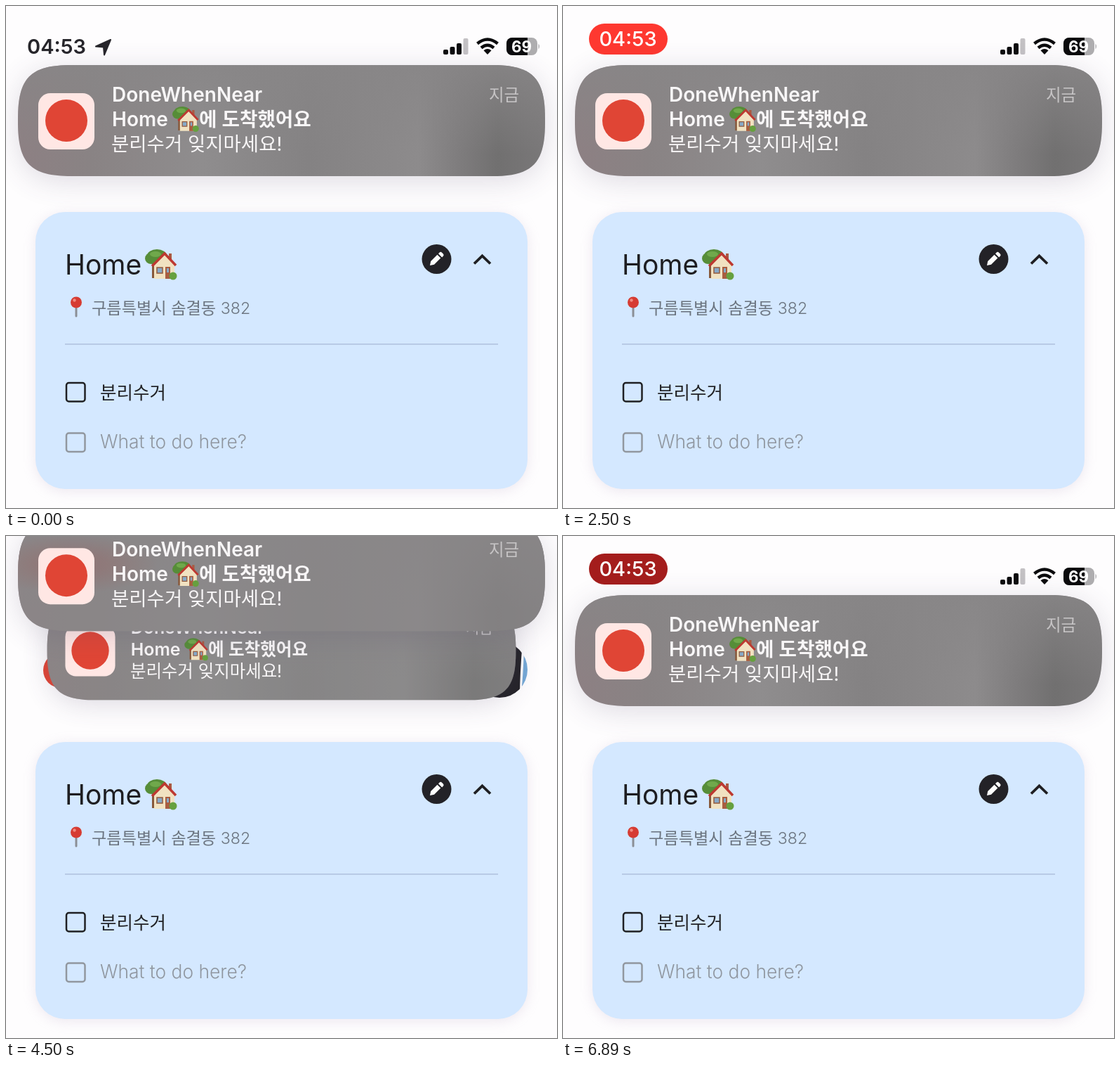
Write an HTML page that moves like this. It is 785 px wide and 714 px high and loops after 7080 ms.

```html
<!DOCTYPE html>
<html lang="ko">
<head>
<meta charset="utf-8">
<title>Arrival reminder</title>
<style>
  html, body { margin: 0; width: 100%; height: 100%; overflow: hidden; background: #fefdfe; }
  svg { display: block; width: 100%; height: 100%; }
  text { font-family: Inter, "Noto Sans CJK KR", "Noto Sans CJK", sans-serif; }
</style>
</head>
<body>
<svg viewBox="0 0 785 714">
  <defs>
    <linearGradient id="glass">
      <stop offset="0" stop-color="#8d8083"/>
      <stop offset=".14" stop-color="#898384"/>
      <stop offset=".35" stop-color="#8f8d8e"/>
      <stop offset=".55" stop-color="#848283"/>
      <stop offset=".76" stop-color="#8d8b8c"/>
      <stop offset=".84" stop-color="#7e7c7d"/>
      <stop offset=".91" stop-color="#717070"/>
      <stop offset="1" stop-color="#7a7879"/>
    </linearGradient>
    <linearGradient id="glassTop" x2="0" y2="1">
      <stop offset="0" stop-color="#888687" stop-opacity=".85"/>
      <stop offset=".8" stop-color="#888687" stop-opacity="0"/>
    </linearGradient>
    <radialGradient id="redGlow">
      <stop offset="0" stop-color="#b0261f"/>
      <stop offset=".4" stop-color="#b0261f" stop-opacity=".75"/>
      <stop offset="1" stop-color="#b0261f" stop-opacity="0"/>
    </radialGradient>
    <filter id="soft" x="-20%" y="-60%" width="140%" height="220%">
      <feGaussianBlur stdDeviation="21"/>
    </filter>
    <filter id="softCard" x="-10%" y="-10%" width="120%" height="120%">
      <feGaussianBlur stdDeviation="9"/>
    </filter>
    <path id="shape" d="M17 160C17 102 35 84 93 84H692C750 84 768 102 768 160V166C768 224 750 242 692 242H93C35 242 17 224 17 166Z"/>
    <clipPath id="shapeClip"><use href="#shape"/></clipPath>
    <clipPath id="charge"><rect x="713" y="45" width="30" height="25"/></clipPath>
    <clipPath id="avatar"><circle cx="703" cy="190" r="40"/></clipPath>

    <g id="house">
      <path d="M10 17h6v24h-6z" fill="#87583a"/>
      <g fill="#568d38">
        <ellipse cx="17" cy="9" rx="14" ry="9"/>
        <ellipse cx="9" cy="13" rx="9" ry="8"/>
        <ellipse cx="23" cy="11" rx="9" ry="8"/>
      </g>
      <ellipse cx="15" cy="7" rx="8" ry="4" fill="#70a84b"/>
      <path d="M34 6h4v9h-4z" fill="#a95a42"/>
      <path d="M13 22L28 7l14 15v20H13z" fill="#f1e2c1"/>
      <path d="M10 24L28 6l16 17" fill="none" stroke="#bd3931" stroke-width="3.5"/>
      <path d="M17 26h8v8h-8z" fill="#86a9c8" stroke="#945b3d" stroke-width="1.5"/>
      <path d="M29 25h7v17h-7z" fill="#a85d40"/>
      <path d="M31 27h3v6h-3z" fill="#86a9c8"/>
      <circle cx="40" cy="38" r="5.5" fill="#66a03f"/>
    </g>

    <g id="panel">
      <use href="#shape" y="7" fill="#54486a" opacity=".19" filter="url(#soft)"/>
      <use href="#shape" fill="url(#glass)"/>
      <use href="#shape" fill="url(#glassTop)"/>
    </g>

    <g id="message" fill="#f8f6f7">
      <rect x="46" y="124" width="80" height="80" rx="17" fill="#ffe7e4"/>
      <circle cx="86" cy="163" r="30" fill="#e04535"/>
      <g font-size="28" font-weight="600">
        <text x="151" y="136">DoneWhenNear</text>
        <text x="151" y="171">Home</text>
        <text x="275" y="171" font-size="27.7">에 도착했어요</text>
      </g>
      <use href="#house" transform="translate(237 143) scale(.83)"/>
      <text x="150" y="206" font-size="27.5">분리수거 잊지마세요!</text>
      <text x="688" y="135" font-size="23.5" fill="#c6c4c5">지금</text>
    </g>
  </defs>

  <rect width="785" height="714" fill="#fefdfe"/>

  <!-- page content under the banners -->
  <circle cx="78" cy="191" r="25" fill="#e04535"/>
  <g clip-path="url(#avatar)">
    <path d="M663 150h73q-4 45-4 80h-69z" fill="#232227"/>
    <path d="M738 150h5v64h-8q3-35 3-64z" fill="#74a8d6"/>
  </g>

  <rect x="42" y="296" width="701" height="394" rx="42" fill="#bba9c4" opacity=".26" filter="url(#softCard)"/>
  <rect x="42" y="293" width="701" height="394" rx="42" fill="#d4e8ff"/>
  <text x="84" y="382" font-size="39" fill="#1e1e21">Home</text>
  <use href="#house" x="198" y="346"/>
  <circle cx="613.5" cy="360" r="21" fill="#232227"/>
  <path d="M604 369l1.2-6 9.3-9.3 4.8 4.8-9.3 9.3zM616 352.2l2-2q1.5-1 3 .5l1.800 1.800q1.500 1.500.3 3l-2 2z" fill="#fff"/>
  <path d="M667 366.500l11.500-11 11.500 11" fill="none" stroke="#1e1e22" stroke-width="3.800"/>
  <path d="M100 427v14" stroke="#8b8f96" stroke-width="3" stroke-linecap="round"/>
  <circle cx="100" cy="421.500" r="8" fill="#d63b32"/>
  <circle cx="97.500" cy="418.500" r="2.200" fill="#f08a80"/>
  <text x="122" y="437.500" font-size="23.200" font-weight="350" fill="#6b747f">구름특별시 솜결동 382</text>
  <path d="M84 481h617" stroke="#b8cae5" stroke-width="2"/>
  <g fill="none" stroke-width="2.500">
    <rect x="86" y="536" width="26.500" height="26.500" rx="3.500" stroke="#1f2023"/>
    <rect x="86" y="607.500" width="26.500" height="26.500" rx="3.500" stroke="#91979f"/>
  </g>
  <text x="134" y="558.500" font-size="25.500" fill="#202124">분리수거</text>
  <text x="134" y="629" font-size="26.400" font-weight="300" fill="#8f969f">What to do here?</text>

  <!-- status bar -->
  <g id="clock" fill="#26252a">
    <text x="30" y="68" font-size="29" font-weight="600">04:53</text>
    <path d="M149 48l-21 9.500 11 1 1 11z" stroke="#26252a" stroke-width="2" stroke-linejoin="round"/>
  </g>
  <g id="pill">
    <rect id="pillBody" x="37" y="25" width="112" height="44" rx="22"/>
    <text x="92.500" y="57" font-size="29" font-weight="500" fill="#fff" text-anchor="middle">04:53</text>
  </g>
  <g fill="#0b0b0d">
    <rect x="623" y="62" width="7" height="7" rx="2"/>
    <rect x="632.500" y="58" width="7" height="11" rx="2"/>
    <rect x="642" y="53" width="7" height="16" rx="2"/>
    <rect x="651.500" y="46" width="7" height="23" rx="2" fill="#c3c1c4"/>
    <path d="M686 69l-5.500-5.700q5.500-4.500 11 0z"/>
    <g fill="none" stroke="#0b0b0d" stroke-width="4.500">
      <path d="M677 59.500q9-7.500 18 0"/>
      <path d="M671.500 53.500q14.500-12 29 0"/>
    </g>
    <rect x="713" y="45" width="44" height="25" rx="8" fill="#aeadaf"/>
    <rect x="713" y="45" width="44" height="25" rx="8" clip-path="url(#charge)"/>
    <path d="M758.500 53.500q3 4 0 8z" fill="#aeadaf"/>
    <text x="734.500" y="65.500" font-size="22.500" font-weight="700" fill="#fff" text-anchor="middle">69</text>
  </g>

  <!-- banners -->
  <g id="back">
    <use href="#panel"/>
    <use id="backFlat" href="#shape" fill="#8a8889"/>
    <use href="#message"/>
  </g>
  <g id="front">
    <use href="#panel"/>
    <use id="frontFlat" href="#shape" fill="#8a8889"/>
    <g clip-path="url(#shapeClip)">
      <ellipse id="tint" cx="93" cy="40" rx="125" ry="42" fill="url(#redGlow)"/>
    </g>
    <use href="#message"/>
  </g>
</svg>
<script>
const LOOP = 7080, STEP = 100;
const ARRIVALS = [628, 2500, 4314];
const SETTLE = 800, TRAVEL = 240, STIFFNESS = 0.01;
const PILL_START = 800, PULSE_PEAK = 2500, PULSE_PERIOD = 3000;
const DARK = [163, 29, 28], BRIGHT = [254, 56, 48];

const el = id => document.getElementById(id);
const set = (id, name, value) => el(id).setAttribute(name, value);
const show = (id, on) => set(id, "visibility", on ? "visible" : "hidden");

// critically damped spring from 0 to 1
const spring = ms => 1 - (1 + STIFFNESS * ms) * Math.exp(-STIFFNESS * ms);

function draw(time) {
  const start = ARRIVALS.find(a => time > a && time < a + SETTLE);
  const moving = start !== undefined;
  const p = moving ? spring(time - start) : 1;
  const offset = TRAVEL * (p - 1);

  show("back", moving);
  set("back", "transform", `translate(392.5 163) scale(${1 - 0.2 * p}) translate(-392.5 -163)`);
  set("backFlat", "opacity", 0.7 * p);
  set("front", "transform", `translate(0 ${offset})`);
  set("frontFlat", "opacity", 0.7 * Math.min(1, -offset / 60));
  set("tint", "transform", `translate(0 ${-offset})`);
  set("tint", "opacity", moving ? p ** 3 : 0);

  const located = time >= PILL_START;
  show("clock", !located);
  show("pill", located);
  const glow = 0.5 + 0.5 * Math.cos(2 * Math.PI * (time - PULSE_PEAK) / PULSE_PERIOD);
  const rgb = DARK.map((d, i) => Math.round(d + (BRIGHT[i] - d) * glow));
  set("pillBody", "fill", `rgb(${rgb})`);
}

// the picture advances in tenths of a second, with a longer hold at the end
function stepped(time) {
  if (time >= 6890) return 6890;
  return Math.min(6700, Math.floor(time / STEP) * STEP);
}

const origin = performance.now();
function tick() {
  draw(stepped((performance.now() - origin) % LOOP));
  requestAnimationFrame(tick);
}
tick();
</script>
</body>
</html>
```
